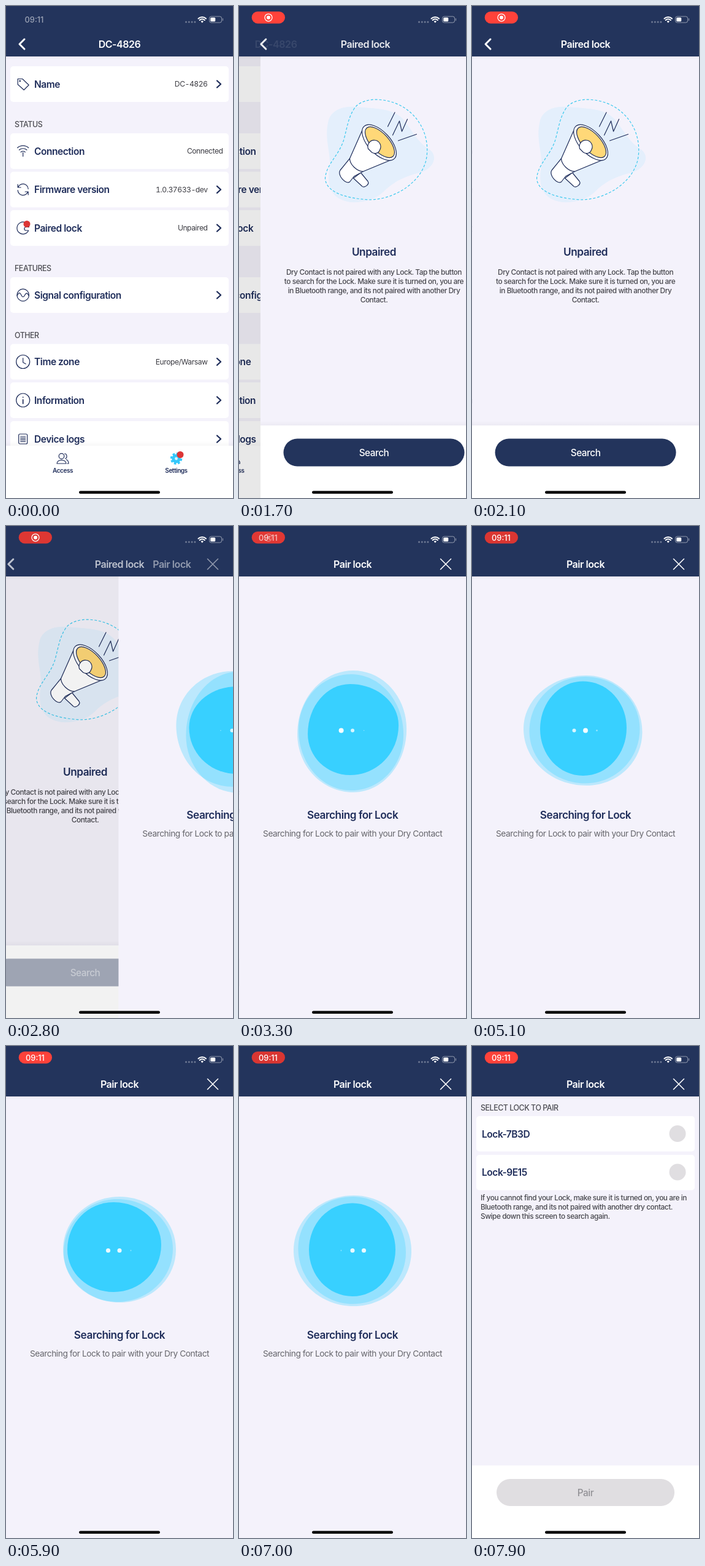
Write an HTML page that moves like this. It is 370 px wide and 800 px high and loops after 8 s.

```html
<!DOCTYPE html>
<html lang="en">
<head>
<meta charset="utf-8">
<title>Pairing a lock</title>
<style>
  html, body { margin: 0; width: 100%; height: 100%; overflow: hidden; background: #f4f2fb; }
  svg { display: block; width: 100vw; height: 100vh; font-family: Inter, "Noto Sans", sans-serif; letter-spacing: -.028em; }
  .bg { fill: #f4f2fb; }
  .card { fill: #fff; }
  .label { font-size: 15.5px; font-weight: 600; fill: #1f2d5a; }
  .value { font-size: 12.1px; fill: #3c3c43; text-anchor: end; font-variant-numeric: tabular-nums; }
  .section { font-size: 12.4px; font-weight: 500; fill: #4c4c52; }
  .title { font-size: 16px; font-weight: 600; fill: #fff; text-anchor: middle; }
  .big { font-size: 17.2px; font-weight: 600; fill: #1f2d5a; text-anchor: middle; }
  .sub { font-size: 13.75px; fill: #66666b; text-anchor: middle; }
  .para { font-size: 11.85px; font-weight: 500; fill: #48484e; }
  .mid { text-anchor: middle; }
  .tab { font-size: 10px; font-weight: 600; fill: #1f2d5a; text-anchor: middle; }
  .button { font-size: 15.3px; font-weight: 500; text-anchor: middle; }
  .clock { font-size: 12.8px; font-weight: 500; fill: #fff; text-anchor: middle; letter-spacing: 0; }
  .line { fill: none; stroke: #1f2d5a; stroke-width: 1.2; stroke-linecap: round; stroke-linejoin: round; }
  .arrow { stroke-width: 2.3; }
  .white { fill: none; stroke: #fff; stroke-linecap: round; stroke-linejoin: round; }
  .blob { fill: #38d0ff; }
  .halo { fill-opacity: .3; }
</style>
</head>
<body>
<svg viewBox="0 0 370 800" preserveAspectRatio="none">
  <defs>
    <linearGradient id="rise" x2="0" y2="1"><stop offset="0" stop-opacity="0"/><stop offset="1" stop-opacity=".03"/></linearGradient>
    <linearGradient id="fall" x2="0" y2="1"><stop offset="0" stop-opacity=".06"/><stop offset="1" stop-opacity="0"/></linearGradient>
  </defs>

  <g id="home">
    <rect class="bg" width="370" height="800"/>
    <g id="rows"></g>
    <rect y="707" width="370" height="8" fill="url(#rise)"/>
    <rect class="card" y="715" width="370" height="85"/>
    <g class="line">
      <circle cx="90.500" cy="732" r="4.300"/>
      <path d="M83 744C83 736.500 98 736.500 98 744Z"/>
      <path d="M95.500 728C100 728 100 735.500 96.500 736M98.500 737.500C101.500 739 102 741 102 744H100"/>
    </g>
    <circle cx="277.500" cy="736" r="7.300" fill="#34c8fb"/>
    <circle cx="277.500" cy="736" r="8" fill="none" stroke="#34c8fb" stroke-width="3.400" stroke-dasharray="3.600 2.683"/>
    <circle cx="277.500" cy="736" r="2.400" fill="#d9f4ff"/>
    <circle cx="284" cy="729.500" r="5.500" fill="#dc3636"/>
    <text class="tab" x="92.500" y="759">Access</text>
    <text class="tab" x="277.500" y="759">Settings</text>
    <rect id="homeDim" width="370" height="800"/>
  </g>

  <g id="detail">
    <rect class="bg" width="370" height="800"/>
    <g transform="translate(-35.500)">
      <path fill="#e4effc" d="M146 188C150 168 172 162 192 164C220 167 250 165 268 184C284 204 292 222 312 234C326 246 316 264 298 270C268 278 252 286 236 302C222 316 200 320 182 319C152 314 143 296 148 262C151 238 139 218 146 188Z"/>
      <path fill="none" stroke="#3cc9ee" stroke-width="1.200" stroke-dasharray="4 2.800" d="M187 169C197 150 230 147 260 160C294 176 311 210 306.500 245C301 285 255 315 213 315C175 313 142 303 141 280C143 256 165 242 172 215C177 196 179 182 187 169Z"/>
      <g class="line">
        <g fill="#fff">
          <path d="M187 280L201 293C204 297 214 290 210.500 285L199 271Z"/>
          <path d="M181 248L165.500 267C160 275 175 291 181 286L188 277L203 269Z"/>
          <path d="M201 203L181 248C181 258 193 269 203 269L249 250Z"/>
          <ellipse cx="229" cy="222" rx="36" ry="18" transform="rotate(47 229 222)"/>
        </g>
        <ellipse cx="230" cy="221.500" rx="31.500" ry="14.500" transform="rotate(47 230 221.500)" fill="#ffd878"/>
        <path fill="#fff" d="M211 232A10.500 10.500 0 1 1 230 234C228 240 222 241 217 238Z"/>
        <path d="M254.500 173L243 196M251 210L262 187L266 204L275 184M260 219L290 208.500"/>
      </g>
    </g>
    <text class="big" x="185" y="406">Unpaired</text>
    <g class="para mid">
      <text x="185" y="437">Dry Contact is not paired with any Lock. Tap the button</text>
      <text x="185" y="452">to search for the Lock. Make sure it is turned on, you are</text>
      <text x="185" y="467">in Bluetooth range, and its not paired with another Dry</text>
      <text x="185" y="482">Contact.</text>
    </g>
    <rect y="674" width="370" height="8" fill="url(#rise)"/>
    <rect class="card" y="682" width="370" height="118"/>
    <g id="search">
      <rect x="37.500" y="703.500" width="295" height="45" rx="22.500" fill="#23345c"/>
      <text id="searchText" class="button" x="185" y="731.500" fill="#fff">Search</text>
    </g>
    <rect id="detailDim" width="370" height="800"/>
  </g>

  <g id="pair">
    <rect class="bg" width="370" height="800"/>
    <g id="searching">
      <path class="blob halo"/>
      <path class="blob halo"/>
      <path class="blob"/>
      <g fill="#fff">
        <circle class="dot" cx="166.500" cy="332.500"/>
        <circle class="dot" cx="185" cy="332.500"/>
        <circle class="dot" cx="203.500" cy="332.500"/>
      </g>
      <text class="big" x="185" y="476">Searching for Lock</text>
      <text class="sub" x="185" y="505">Searching for Lock to pair with your Dry Contact</text>
    </g>
    <g id="found">
      <text class="section" x="14" y="104.500">SELECT LOCK TO PAIR</text>
      <rect class="card" x="7" y="114" width="356" height="57.500" rx="5"/>
      <rect class="card" x="7" y="177" width="356" height="57.500" rx="5"/>
      <text class="label" x="16" y="148.500">Lock-7B3D</text>
      <text class="label" x="16" y="211">Lock-9E15</text>
      <circle cx="335" cy="142.500" r="13.500" fill="#e0dee1"/>
      <circle cx="335" cy="205" r="13.500" fill="#e0dee1"/>
      <g class="para">
        <text x="14" y="251">If you cannot find your Lock, make sure it is turned on, you are in</text>
        <text x="14" y="266">Bluetooth range, and its not paired with another dry contact.</text>
        <text x="14" y="281">Swipe down this screen to search again.</text>
      </g>
      <rect class="card" y="682" width="370" height="118"/>
      <rect x="40" y="704" width="290" height="44" rx="22" fill="#e0dee1"/>
      <text class="button" x="185" y="731.500" fill="#919095">Pair</text>
    </g>
  </g>

  <rect y="82" width="370" height="4" fill="url(#fall)"/>
  <rect width="370" height="82" fill="#23345c"/>
  <text id="homeTitle" class="title" y="68">DC-4826</text>
  <text id="detailTitle" class="title" y="68">Paired lock</text>
  <text id="pairTitle" class="title" y="68">Pair lock</text>
  <path id="homeBack" class="white" stroke-width="3" d="M30 54L22 62L30 70"/>
  <path id="detailBack" class="white" stroke-width="3" d="M30 54L22 62L30 70"/>
  <path id="close" class="white" stroke-width="1.600" d="M328.500 53.500L345.500 70.500M345.500 53.500L328.500 70.500"/>

  <text id="plainClock" class="clock" x="46" y="26.500">09:11</text>
  <g id="pill">
    <rect id="pillShape" x="20.700" y="9" width="54.300" height="19.400" rx="9.700"/>
    <g id="record">
      <circle class="white" cx="48" cy="18.800" r="6" stroke-width="1.300"/>
      <circle cx="48" cy="18.800" r="3" fill="#fff"/>
    </g>
    <text id="pillClock" class="clock" x="47.500" y="23.500">09:11</text>
  </g>
  <path class="white" opacity=".35" stroke-width="3" stroke-dasharray="0 4.800" d="M293.500 26H308.500"/>
  <g class="white" stroke-width="2" stroke-linecap="butt">
    <path d="M313.500 20.500A9 9 0 0 1 326 20.500M315.700 23A5.800 5.800 0 0 1 323.800 23"/>
  </g>
  <path fill="#fff" d="M317.600 25A3.200 3.200 0 0 1 321.900 25L319.750 27.400Z"/>
  <rect x="331.500" y="17" width="20" height="10" rx="3" fill="none" stroke="#fff" opacity=".5"/>
  <rect x="333.200" y="18.700" width="8" height="6.600" rx="1.500" fill="#fff"/>
  <path d="M353.500 20.500V23.500" class="white" opacity=".5"/>
  <rect x="119" y="788.500" width="132" height="4.500" rx="2.250"/>
</svg>

<script>
const LOOP = 8000;
const $ = id => document.getElementById(id);

const icons = {
  tag: '<path d="M-8.500 -8.500H-1L9.500 1.500L1.500 9.500L-8.500 .500Z"/><circle cx="-5" cy="-5" r=".8"/>',
  wifi: '<path d="M-9 -5.500C-4 -10 4 -10 9 -5.500M-6.200 -2C-3 -5 3 -5 6.200 -2M-3.500 1.500C-1.500 -.500 1.500 -.500 3.500 1.500M0 2V8.500"/>',
  sync: '<path d="M-8.500 -8.500V-3.500H-3.500M-8 -3.500A8.500 8.500 0 0 1 8.500 -1M8.500 8.500V3.500H3.500M8 3.500A8.500 8.500 0 0 1 -8.500 1"/>',
  lock: '<path d="M9.700 -1.500H4.500A2.800 2.800 0 0 0 4.500 4H9A9.800 9.800 0 1 1 9.700 -1.500Z"/><circle cx="6.300" cy="-6.500" r="5.500" fill="#dc3636" stroke="none"/>',
  wave: '<circle r="9.800"/><path d="M-9.500 1C-6.500 -5.500 -4.500 -4 -2.800 0S1 4 3 0S7 -4 9.500 1"/>',
  clock: '<circle r="11"/><path d="M0 -6V1L4.500 3.500"/>',
  info: '<circle r="11"/><path stroke-width="1.700" d="M0 -1V5.500M0 -5V-4.800"/>',
  logs: '<rect x="-7" y="-8" width="14" height="16" rx="2"/><path d="M-4 -4H4M-4 -1.300H4M-4 1.400H4M-4 4.100H4"/>'
};

const row = (y, icon, label, value = '', arrow = true) => `
  <rect class="card" x="7" y="${y - 29}" width="356" height="58" rx="5"/>
  <g class="line" transform="translate(27.700 ${y})">${icons[icon]}</g>
  <text class="label" x="46" y="${y + 5.5}">${label}</text>
  <text class="value" x="${arrow ? 328.5 : 353.5}" y="${y + 4.3}">${value}</text>
  ${arrow ? `<path class="line arrow" d="M344 ${y - 5.5}L350 ${y}L344 ${y + 5.5}"/>` : ''}`;
const section = (y, name) => `<text class="section" x="14" y="${y + 4.3}">${name}</text>`;

$('rows').innerHTML = [
  row(127, 'tag', 'Name', 'DC-4826'),
  section(192.5, 'STATUS'),
  row(236, 'wifi', 'Connection', 'Connected', false),
  row(298.5, 'sync', 'Firmware version', '1.0.37633-dev'),
  row(361, 'lock', 'Paired lock', 'Unpaired'),
  section(426.5, 'FEATURES'),
  row(470, 'wave', 'Signal configuration'),
  section(535.5, 'OTHER'),
  row(578.5, 'clock', 'Time zone', 'Europe/Warsaw'),
  row(641, 'info', 'Information'),
  row(704, 'logs', 'Device logs')
].join('');

// Per blob and time: left, top, right, bottom, then the lean of its extremes.
const times = [2800, 3300, 4300, 5900, 6600, 7400];
const shapes = [
  [[94, 236, 270, 424, 4, 6], [95, 235, 273, 433, 2, -4], [75, 241, 278, 427, 11, 6],
   [93, 245, 277, 417, 0, 0], [86, 246, 283, 418, 4, 5], [92, 240, 279, 428, 0, -4]],
  [[110, 237, 274, 434, 4, -5], [97, 241, 268, 430, 0, 4], [93, 241, 275, 421, 4, 0],
   [94, 249, 272, 416, -2, -3], [96, 247, 274, 415, 3, 3], [97, 243, 270, 424, 0, 4]],
  [[115, 261, 262, 403, 4, 4], [112, 257, 260, 405, -5, -7], [122, 251, 251, 412, 0, 2],
   [100, 254, 253, 400, -1, -4], [112, 258, 258, 406, 3, 4], [116, 253, 252, 408, -2, -4]]
];
const blobs = document.querySelectorAll('.blob');
const dots = document.querySelectorAll('.dot');

const ramp = (t, a, b) => Math.min(1, Math.max(0, (t - a) / (b - a)));
const mix = (a, b, k) => a + (b - a) * k;
const push = (t, start) => {
  const x = Math.max(0, t - start) * .018;
  return 1 - (1 + x) * Math.exp(-x);
};
const place = (id, x, opacity = 1) => {
  $(id).setAttribute('transform', `translate(${x.toFixed(2)})`);
  $(id).setAttribute('opacity', opacity);
};
const fade = (id, opacity) => $(id).setAttribute('opacity', opacity);

function blobPath(keys, t) {
  let i = 0;
  while (i < times.length - 2 && t > times[i + 1]) i++;
  const u = ramp(t, times[i], times[i + 1]), k = u * u * (3 - 2 * u);
  const [l, top, r, b, leanX, leanY] = keys[i].map((v, n) => mix(v, keys[i + 1][n], k));
  const x = (l + r) / 2 + leanX, cy = (top + b) / 2, ry = cy + leanY, ly = cy - leanY, c = .555;
  return `M${x} ${top}C${mix(x, r, c)} ${top} ${r} ${mix(ry, top, c)} ${r} ${ry}` +
    `C${r} ${mix(ry, b, c)} ${mix(x, r, c)} ${b} ${x} ${b}` +
    `C${mix(x, l, c)} ${b} ${l} ${mix(ly, b, c)} ${l} ${ly}` +
    `C${l} ${mix(ly, top, c)} ${mix(x, l, c)} ${top} ${x} ${top}Z`;
}

function drawPill(t) {
  const glow = t < 2000 ? 1 : (1 + Math.cos(t * Math.PI / 1000)) / 2;
  const text = ramp(t, 3000, 3450);
  $('pillShape').setAttribute('fill', `rgb(${mix(217, 255, glow)},${mix(54, 66, glow)},${mix(50, 58, glow)})`);
  fade('plainClock', .55 * (1 - ramp(t, 0, 250)));
  fade('pill', ramp(t, 50, 500));
  fade('record', 1 - text);
  fade('pillClock', text);
}

function drawScreens(t) {
  const p = push(t, 1481), q = push(t, 2707), leave = Math.cos(q * Math.PI / 2);
  const press = ramp(t, 2400, 2600);
  place('home', -111 * p);
  place('detail', 370 * (1 - p) - 111 * q);
  place('pair', 370 * (1 - q));
  fade('homeDim', .1 * p);
  fade('detailDim', .1 * q);
  fade('search', 1 - .6 * press);
  fade('searchText', 1 - .5 * press);

  place('homeTitle', 185 - 138 * p, 1 - p);
  place('homeBack', -36 * p, 1 - p);
  place('detailTitle', 185 + 221 * (1 - p), p * leave);
  place('detailBack', 147 * (1 - p) - 36 * q, p * leave);
  place('pairTitle', 185 + 172 * (1 - q), q);
  fade('close', q);
}

function drawSearch(t) {
  const done = t >= 7800;
  $('searching').style.display = done ? 'none' : '';
  $('found').style.display = done ? '' : 'none';
  blobs.forEach((el, i) => el.setAttribute('d', blobPath(shapes[i], t)));
  dots.forEach((el, i) => {
    const w = (1 + Math.cos(2 * Math.PI * (t / 850 - .8 - .29 * i))) / 2;
    el.setAttribute('r', .8 + 3.4 * w);
    el.setAttribute('opacity', .45 + .55 * w);
  });
}

const start = performance.now();
function frame() {
  const t = (performance.now() - start) % LOOP;
  drawPill(t);
  drawScreens(t);
  drawSearch(t);
  requestAnimationFrame(frame);
}
frame();
</script>
</body>
</html>
```
